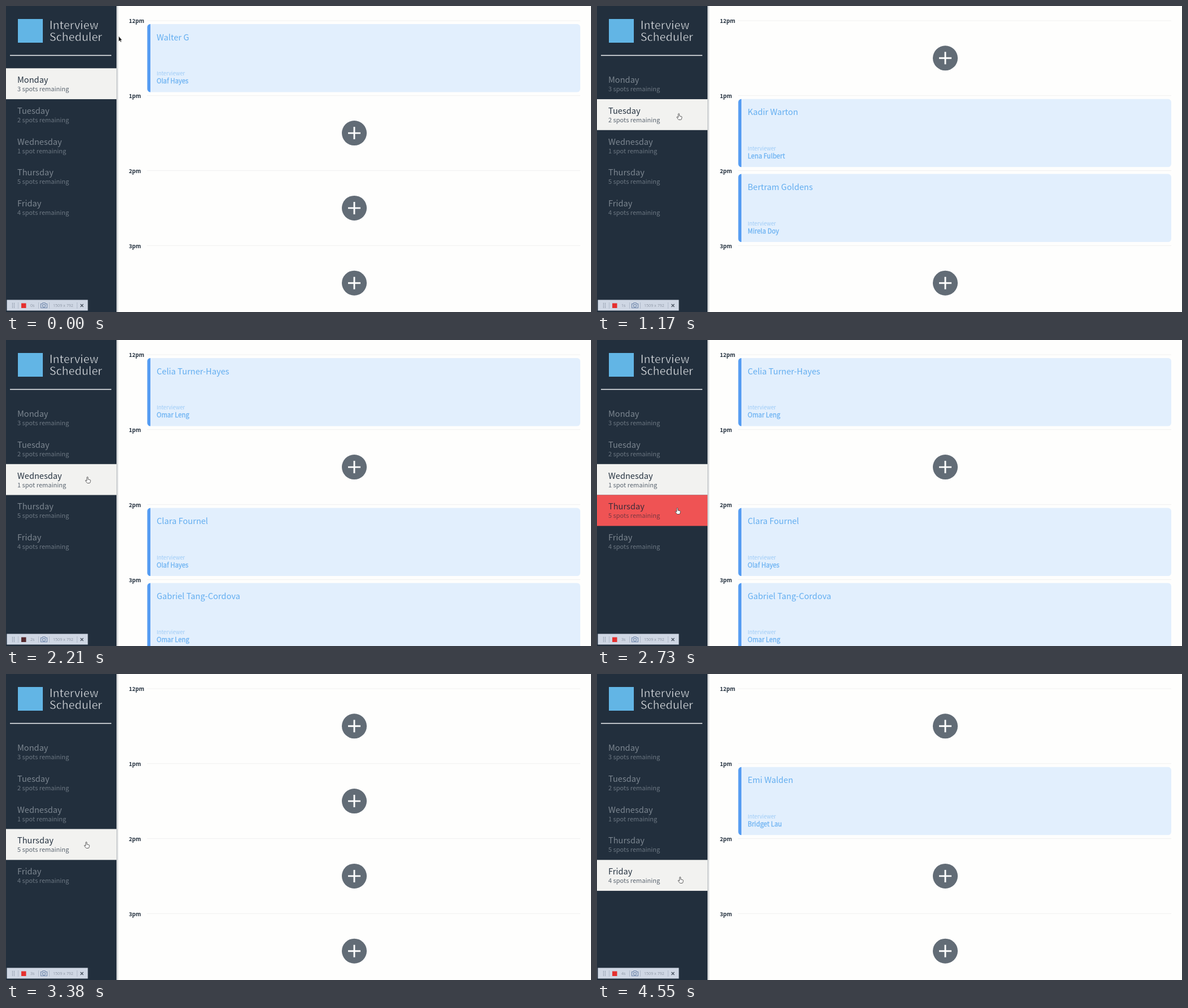
Animation, 1033 px wide and 542 px high, one loop 4.68 s. Source, as an HTML page:

```html
<!DOCTYPE html>
<html lang="en">
<head>
<meta charset="utf-8">
<title>Interview Scheduler</title>
<style>
  html, body { margin: 0; width: 100%; height: 100%; overflow: hidden; background: #fefefd; }
  svg { display: block; width: 100vw; height: 100vh; }
  text { font-family: "Noto Sans CJK JP", "Noto Sans CJK SC", "Noto Sans CJK", "Open Sans", sans-serif; }
  /* a stroke in the ground colour thins the letters */
  .brand { font-size: 19.7px; fill: #e9ecef; stroke: #222f3d; stroke-width: .5px; }
  .day { font-size: 14.6px; fill: #7c8690; }
  .spots { font-size: 11.05px; fill: #6c7782; }
  .item rect { fill: none; }
  .hover rect { fill: #ef5354; }
  .hover .day { fill: #3b2c39; }
  .hover .spots { fill: #7b3943; }
  .active rect { fill: #f2f2f0; }
  .active .day { fill: #263341; }
  .active .spots { fill: #5c6671; }
  .hour { font-size: 9.7px; font-weight: 700; fill: #222f3d; }
  .name { font-size: 14.6px; fill: #63aef0; }
  .role { font-size: 9.4px; fill: #9dcbf6; }
  .host { font-size: 11.3px; fill: #6cb2f2; stroke: #6cb2f2; stroke-width: .3px; }
  .bar text { font-family: "Open Sans", sans-serif; font-size: 7.1px; fill: #8e97a6; }
</style>
</head>
<body>
<svg viewBox="0 0 1033 542" preserveAspectRatio="none">
  <defs>
    <linearGradient id="shade">
      <stop offset="0" stop-color="#222f3d" stop-opacity=".3"/>
      <stop offset="1" stop-color="#222f3d" stop-opacity="0"/>
    </linearGradient>
    <g id="plus">
      <circle r="22" fill="#626c76"/>
      <path d="M-11 0H11M0-11V11" stroke="#fff" stroke-width="2.9"/>
    </g>
    <g id="card">
      <rect x="249.5" y="6" width="764.5" height="120.5" rx="5.5" fill="#e2effd"/>
      <path d="M255 6v120.5a5.5 5.5 0 0 1-5.5-5.5V11.5a5.5 5.5 0 0 1 5.5-5.5z" fill="#559cf2"/>
    </g>
  </defs>

  <rect width="1033" height="542" fill="#fefefd"/>
  <g id="slots"></g>

  <rect x="195" width="4" height="542" fill="url(#shade)"/>
  <rect width="195" height="542" fill="#222f3d"/>
  <rect x="21" y="23" width="44" height="42" fill="#62b5e5"/>
  <text class="brand" x="76.8" y="41.3">Interview</text>
  <text class="brand" x="76.8" y="61.5">Scheduler</text>
  <path d="M7 87.5H186" stroke="#f4f5f6" stroke-width="1.6"/>
  <g id="menu"></g>

  <g class="bar">
    <rect x="1.5" y="520.5" width="143" height="19" fill="#cfd7e4"/>
    <path d="M11.5 526v9M14.5 526v9" stroke="#7f8a9b" stroke-width="1.2" stroke-dasharray="1.2 1.3"/>
    <path d="M21.5 525v11M57.5 525v11M76.5 525v11M125.5 525v11" stroke="#a9b3c3" stroke-width=".8"/>
    <rect id="rec" x="27" y="526.5" width="8.5" height="8.5"/>
    <text id="clock" x="43" y="533.2"></text>
    <g fill="none" stroke="#6d85aa" stroke-width="1.1">
      <path d="M61.5 527.5h2.500l1-1.800h4l1 1.800h2.500v7.300h-11z"/>
      <circle cx="67" cy="531" r="2.5"/>
    </g>
    <text x="83" y="533.2">1509 x 792</text>
    <path d="M131.500 528l5 5M136.500 528l-5 5" stroke="#4b5563" stroke-width="1.4"/>
  </g>

  <g id="cursor">
    <path id="arrow" d="M0-4.500V4.800L2.100 2.900 3.500 6 4.900 5.400 3.500 2.400H6z" fill="#111" stroke="#fff" stroke-width=".4"/>
    <path id="hand" d="M-2.200-5q1-1.300 2 0V-1.200l3.500.8q1.200.3 1 1.600l-.6 2.700q-.3 1.600-1.500 1.600h-3q-1 0-1.600-1l-2.300-3.200q-.3-1.200.9-.9l1.600 1z" fill="#fff" stroke="#333" stroke-width=".8"/>
  </g>
</svg>
<script>
const LOOP = 4680, STEP = 130;
const TOP = 110.3, ROW = 54.75, HOUR = 132.8;

const WEEK = [
  { day: "Monday", spots: "3 spots", slots: [["Walter G", "Olaf Hayes"], , , ,] },
  { day: "Tuesday", spots: "2 spots", slots: [, ["Kadir Warton", "Lena Fulbert"], ["Bertram Goldens", "Mirela Doy"], ,] },
  { day: "Wednesday", spots: "1 spot", slots: [["Celia Turner-Hayes", "Omar Leng"], , ["Clara Fournel", "Olaf Hayes"], ["Gabriel Tang-Cordova", "Omar Leng"]] },
  { day: "Thursday", spots: "5 spots", slots: [] },
  { day: "Friday", spots: "4 spots", slots: [, ["Emi Walden", "Bridget Lau"], , ,] }
];
const CLICKS = [0, 1170, 2210, 3380, 4290];
const TICKS = [650, 1690, 2730, 3770];
// time, x, y
const PATH = [
  [0, 199, 58], [130, 197, 63], [650, 160, 162], [910, 147, 194],
  [1300, 145, 197], [1820, 144, 247], [2080, 144, 247], [2210, 145, 248],
  [2730, 143, 303], [3380, 143, 303], [4030, 148, 365], [LOOP, 148, 365]
];

const $ = id => document.getElementById(id);
const label = (cls, x, y, s) => `<text class="${cls}" x="${x}" y="${y}">${s}</text>`;

function slot(entry, i) {
  const body = entry
    ? `<use href="#card"/>` + label("name", 266, 34.5, entry[0]) +
      label("role", 266, 97, "Interviewer") + label("host", 266, 111, entry[1])
    : `<use href="#plus" x="615" y="66.3"/>`;
  return `<g transform="translate(0 ${26 + i * HOUR})">
    <path d="M249 0H1014" stroke="#f0f0f0"/>
    ${label("hour", 217, 4.2, ["12pm", "1pm", "2pm", "3pm"][i])}${body}</g>`;
}

$("menu").innerHTML = WEEK.map((d, i) =>
  `<g class="item" transform="translate(0 ${TOP + i * ROW})">
    <rect width="195" height="${ROW}"/>
    ${label("day", 20, 25.9, d.day)}${label("spots", 20, 40.9, d.spots + " remaining")}</g>`).join("");
$("slots").innerHTML = WEEK.map(d =>
  `<g>${[0, 1, 2, 3].map(i => slot(d.slots[i], i)).join("")}</g>`).join("");

const items = [...$("menu").children], pages = [...$("slots").children];
const passed = (times, t) => times.filter(v => v <= t).length;

function cursorAt(t) {
  const i = PATH.findIndex(p => p[0] > t);
  const a = PATH[i - 1], b = PATH[i], k = (t - a[0]) / (b[0] - a[0]);
  return [1, 2].map(n => a[n] + (b[n] - a[n]) * k);
}

function draw(t) {
  const [x, y] = cursorAt(t);
  const active = passed(CLICKS, t) - 1;
  const over = x < 195 ? Math.floor((y - TOP) / ROW) : -1;
  items.forEach((el, i) => {
    el.setAttribute("class", "item" + (i === active ? " active" : i === over ? " hover" : ""));
    pages[i].style.display = i === active ? "" : "none";
  });
  $("cursor").setAttribute("transform", `translate(${x} ${y})`);
  $("arrow").style.display = over < 0 ? "" : "none";
  $("hand").style.display = over < 0 ? "none" : "";
  $("clock").textContent = passed(TICKS, t) + "s";
  $("rec").setAttribute("fill", t >= 2210 && t < 2470 ? "#54292e" : "#e5302f");
}

function frame() {
  const t = performance.now() % LOOP;
  draw(Math.floor(t / STEP) * STEP);
  requestAnimationFrame(frame);
}
frame();
</script>
</body>
</html>
```
